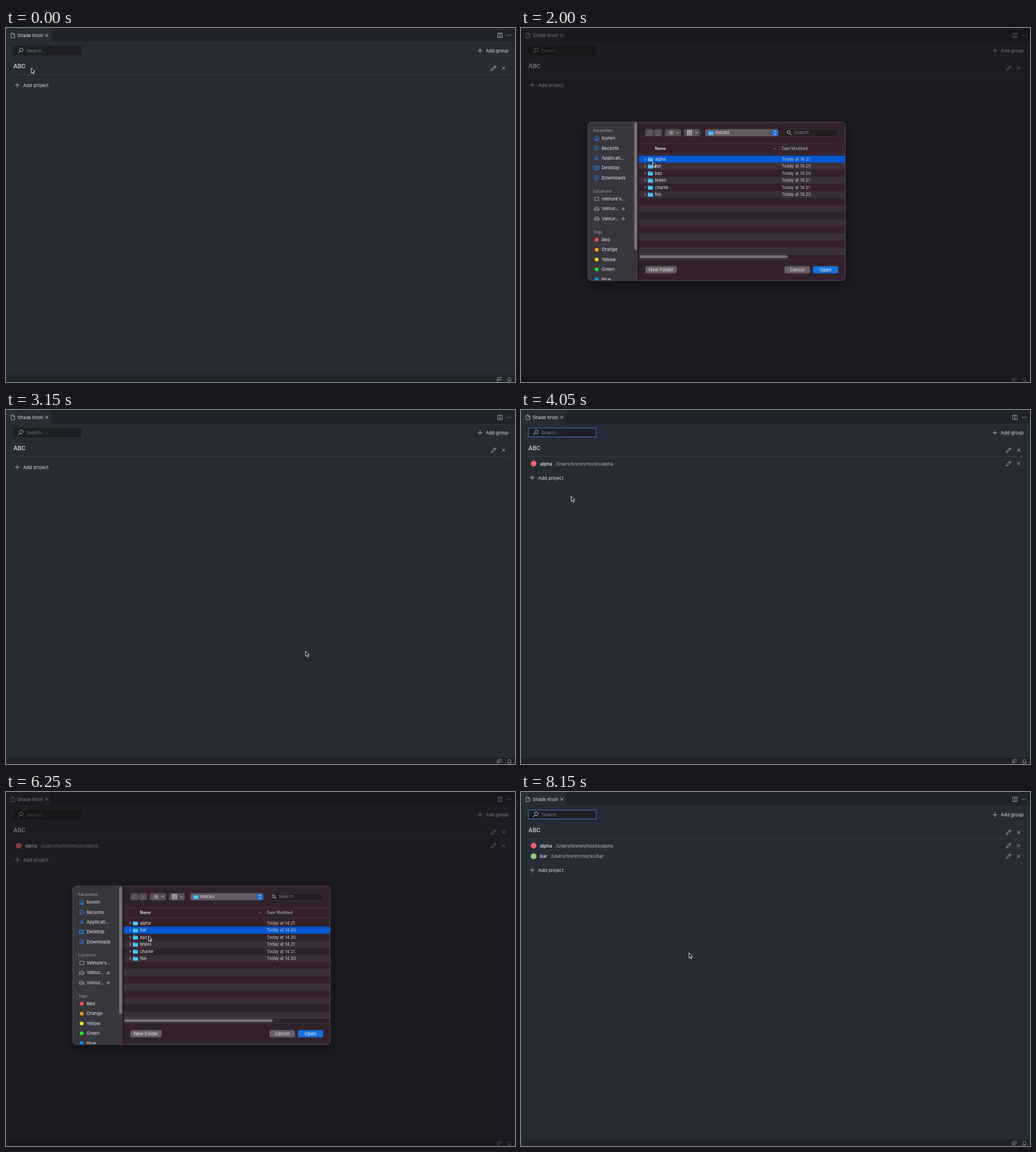
Recreate the animation shown at these times as an HTML page. Size 898 by 624 pixels, loop 8250 ms.

```html
<!DOCTYPE html>
<html lang="en">
<head>
<meta charset="utf-8">
<title>Project list</title>
<style>
html, body { margin: 0; width: 100%; height: 100%; overflow: hidden; background: #282c34; }
svg { display: block; font-family: Inter, Roboto, sans-serif; }
text { white-space: pre; }
#sheet { --side: #38363b; --list: #31222b; --stripe: #3c2f37; --accent: #1a8cff; --drive: #a9a7aa; --open: #1871dc; --thumb: #77727a; }
#sheet.idle { --side: #3a3a3a; --list: #1e1e1e; --stripe: #292929; --accent: #000; --drive: #000; --open: #2a76f2; --thumb: #787878; }
#sheet.idle .tag { fill: #000; }
</style>
</head>
<body>
<svg id="stage" width="898" height="624" viewBox="0 0 898 624"></svg>
<script>
const LOOP = 8250, STEP = 50;
const ROW = 12.45, LIST_TOP = 225;

const attrs = o => Object.entries(o).map(([k, v]) => `${k}="${v}"`).join(' ');
const rect = (x, y, w, h, fill, more = {}) =>
  `<rect ${attrs({ x, y, width: w, height: h, fill, ...more })}/>`;
const line = (d, stroke, width = 0.8, more = {}) =>
  `<path ${attrs({ d, stroke, 'stroke-width': width, fill: 'none', ...more })}/>`;
const dot = (x, y, r, fill, more = {}) => `<circle ${attrs({ cx: x, cy: y, r, fill, ...more })}/>`;
const at = (x, y, body) => `<g transform="translate(${x} ${y})">${body}</g>`;
// y is the middle of the capitals
const text = (x, y, str, size = 8, fill = '#d3d5da', weight = 400, anchor = 'start') =>
  `<text ${attrs({ x, y: y + size * 0.36, 'font-size': size, fill, 'font-weight': weight, 'text-anchor': anchor })}>${str}</text>`;

const cross = (x, y, r = 2.6) => at(x, y, line(`M${-r} ${-r}L${r} ${r}M${r} ${-r}L${-r} ${r}`, '#c9ccd2', 0.9));
const plus = (x, y) => at(x, y, line('M-4.2 0H4.2M0-4.2V4.2', '#d0d2d7', 0.85));
const pencil = (x, y) => at(x, y,
  line('M-4 4L-3.2 1.3L2-3.9Q3-4.6 3.9-3.7Q4.6-2.8 3.8-2L-1.4 3.2ZM1-2.9L2.9-1', '#c9ccd2', 0.85));
const lens = (x, y, r, flip, color) => at(x, y,
  dot(0, 0, r, 'none', { stroke: color, 'stroke-width': 0.9 }) +
  line(`M${0.7 * r * flip} ${0.7 * r}L${1.85 * r * flip} ${1.9 * r}`, color, 1));

function editor() {
  return rect(0, 0, 898, 624, '#282c34') +
    rect(0, 0, 898, 24, '#21252b') + rect(1, 0, 79.5, 24, '#282c34') +
    rect(80, 0, 0.8, 24, '#1b1e23') + rect(0, 0, 1, 612, '#20232a') +
    line('M9 9H13L15.3 11.3V17H9ZM12.8 9V11.5H15.3', '#c9ccd2', 0.8) +
    text(20.3, 13, 'Shade Knoll', 8, '#dcdee2') + cross(72, 13) +
    line('M867.7 9.2H875.3V16.8H867.7ZM871.5 9.2V16.8', '#c9ccd2', 0.8) +
    [884.3, 887.4, 890.5].map(x => dot(x, 13, 0.75, '#c9ccd2')).join('') +
    rect(13, 31.5, 120, 16.5, '#1d1f23') +
    `<rect id="focus" x="13" y="31.8" width="119.6" height="15.8" fill="none" stroke="#4879d8" stroke-width="1"/>` +
    lens(27, 38.5, 3.2, -1, '#c9ccd2') + text(36, 40, 'Search...', 8, '#777a81') +
    plus(836.3, 40) + text(846.4, 40, 'Add group', 8.15, '#dcdee2') +
    text(13, 67.5, 'ABC', 10, '#b7bbc4', 700) + pencil(860, 71) + cross(878, 71) +
    rect(13, 82, 875, 0.8, '#3d424d') +
    project(0, 'alpha', 61.3, '#f4616e') + project(1, 'bar', 52.8, '#8fcc72') +
    `<g id="add">` + `<rect id="hover" x="13" y="94" width="64" height="14" rx="3" fill="#5a5d5e" opacity=".31"/>` +
    plus(20, 100.6) + text(30.3, 101, 'Add project', 8.15, '#dcdee2') + `</g>` +
    rect(0, 612, 898, 12, '#21252b') + rect(0, 622.5, 898, 1.5, '#1a1c23') +
    at(869.5, 619.5, line('M-2-3.5H3.8V.8H2.2L.8 2.2V.8M-3.6 4Q-3.4 1.3-1.5 1.3Q.3 1.3.5 4', '#a9adb5', 0.75) +
      dot(-1.5, -0.4, 1.5, 'none', { stroke: '#a9adb5', 'stroke-width': 0.75 })) +
    at(888, 619.5, line('M-3.4 2.3H3.4L2.5.8V-1Q2.4-3.5 0-3.5Q-2.4-3.5-2.5-1V.8ZM-1 2.6Q0 4.2 1 2.6', '#a9adb5', 0.8));
}

function project(i, name, pathX, color) {
  const y = 94.6 + 18.7 * i;
  return `<g id="project${i}">` + dot(22.3, y, 5.1, color) +
    text(33.2, y + 0.2, name, 8.15, '#c5c8cf', 700) +
    text(pathX, y + 0.2, '/Users/tovren/mocks/' + name, 7.85, '#b9bdc5') +
    pencil(860, y) + cross(878, y) + `</g>`;
}

function sidebar() {
  const accent = 'var(--accent)', drive = 'var(--drive)';
  const icon = (y, d, color = accent) => at(133.5, y, line(d, color, 0.95));
  const ring = y => dot(133.5, y, 3.9, 'none', { stroke: accent, 'stroke-width': 0.9 });
  const label = (y, s) => text(142.3, y, s, 8, '#e9e8ea');
  const head = (y, s) => text(127.7, y, s, 6.85, '#98959a', 500);
  const disk = y => icon(y, 'M-4.2.5L-2.6-2.7H2.6L4.2.5V3H-4.2ZM-4.2.5H4.2', drive) +
    at(180.5, y, `<path d="M-3 .5L0-2.7L3 .5ZM-3 1.4H3V2.5H-3Z" fill="#99969a"/>`);
  const places = ['tovren', 'Recents', 'Applicati...', 'Desktop', 'Downloads'];
  const tags = { Red: '#ff4f4b', Orange: '#ff9b0b', Yellow: '#ffec0c', Green: '#16ef25', Blue: '#0c92ff' };
  return rect(118, 166, 88.5, 279, 'var(--side)') +
    head(180.7, 'Favourites') + places.map((s, i) => label(194.4 + 17.4 * i, s)).join('') +
    icon(194.4, 'M-4.3 0L0-4L4.3 0M-3-.8V3.8H3V-.8M-1 3.5V1H1V3.5') +
    ring(211.8) + icon(211.8, 'M0-2.4V.2H-1.8') +
    icon(229.2, 'M-3.2 3.4L.7-3.8M3.2 3.4L-.7-3.8M-4.2 1.3H4.2') +
    icon(246.6, 'M-4.2-3.2H4.2V3.2H-4.2ZM-4-1.6H4M-2.5 2H2.5') +
    ring(264) + icon(264, 'M0-2.2V2M-1.7.4L0 2.1L1.7.4') +
    head(287.5, 'Locations') +
    icon(301.2, 'M-3.4 2V-2.9H3.4V2M-4.8 2.7H4.8', drive) + label(301.2, "Velnure's...") +
    [318.6, 336].map(y => disk(y) + label(y, 'Velnur...')).join('') +
    head(359.6, 'Tags') +
    Object.entries(tags).map(([s, c], i) =>
      dot(133.5, 373.3 + 17.4 * i, 3.3, c, { class: 'tag' }) + label(373.2 + 17.4 * i, s)).join('') +
    rect(206.3, 166, 1.2, 279, '#151215') +
    rect(199.6, 167, 5.2, 224, 'var(--thumb)', { rx: 2.6 });
}

const folder = (x, y) => at(x, y,
  `<path d="M-4.4-3Q-4.4-3.8-3.6-3.8H-1.2L-.3-2.9H3.7Q4.4-2.9 4.4-2.2V3Q4.4 3.8 3.6 3.8H-3.6Q-4.4 3.8-4.4 3Z" fill="#219bd6"/>` +
  rect(-4.4, -1.7, 8.8, 5.5, '#4fc3f7', { rx: 0.7 }));

function fileList() {
  const files = { alpha: 21, bar: 20, baz: 20, bravo: 21, charlie: 21, foo: 20 };
  let out = '';
  for (let i = 1; i < 14; i += 2) out += rect(207.5, LIST_TOP + i * ROW, 364.5, ROW, 'var(--stripe)');
  out += `<rect id="pick" x="207.5" y="${LIST_TOP}" width="364.5" height="${ROW}" fill="#0058d0"/>`;
  Object.entries(files).forEach(([name, minute], i) => {
    const y = LIST_TOP + (i + 0.5) * ROW;
    out += line(`M217.8 ${y - 2.2}L220.2 ${y}L217.8 ${y + 2.2}`, '#d2ced1', 1) + folder(228.3, y) +
      text(236.2, y, name, 7.45, '#ebe8ea') + text(460, y, 'Today at 14:' + minute, 7.45, '#cfcacd');
  });
  return out;
}

function controls() {
  const soft = { rx: 3, 'fill-opacity': 0.2 };
  const pill = (x, y, w, h) => rect(x, y, w, h, '#fff', soft);
  const down = x => line(`M${x - 2} 183.6L${x} 185.6L${x + 2} 183.6`, '#dedbdd', 1);
  let rows = '';
  for (const y of [182, 184.5, 187]) {
    rows += rect(260, y - 0.4, 1.1, 0.9, '#dedbdd') + rect(262.3, y - 0.4, 6.2, 0.9, '#dedbdd');
    for (const x of [293, 296.2, 299.4]) rows += rect(x, y - 1.2, 2.4, 1.8, '#cfcbce');
  }
  return pill(219.5, 178.3, 14.2, 12.7) + pill(234.7, 178.3, 14.2, 12.7) +
    line('M228 181.8L225.2 184.6L228 187.4M240.6 181.8L243.4 184.6L240.6 187.4', '#8e868b', 0.9) +
    pill(253.7, 178.3, 28.5, 12.7) + pill(287.5, 178.3, 28, 12.7) + rows + down(276.2) + down(309.3) +
    line('M293 180.2H301.8M293 189.2H301.8', '#cfcbce', 0.7) +
    rect(325, 178.3, 129, 12.7, '#fff', { rx: 3, 'fill-opacity': 0.25 }) + folder(335, 184.6) +
    text(342.8, 184.4, 'mocks', 7.95, '#ebe8ea') +
    rect(443, 179.2, 10, 11, '#1871dc', { rx: 2.2 }) +
    line('M446 183.4L448 181.4L450 183.4M446 186L448 188L450 186', '#fff', 1) +
    rect(464.5, 178.4, 94.5, 12.5, '#000', { rx: 3, 'fill-opacity': 0.2, stroke: '#fff', 'stroke-opacity': 0.12, 'stroke-width': 0.7 }) +
    lens(472.2, 183.8, 2.7, 1, '#dedbdd') + text(481.3, 184.6, 'Search', 7.95, '#8f888d') +
    line('M207.5 204.3H572M207.5 222H572M455.6 205V222M568 205V222M207.5 398.2H572M207.5 408H572', '#fff', 0.7, { 'stroke-opacity': 0.13 }) +
    text(236.2, 212.7, 'Name', 6.9, '#ebe8ea', 600) + text(460, 212.7, 'Date Modified', 6.9, '#cfcacd') +
    line('M445.4 214.1L447.6 211.9L449.8 214.1', '#a8a2a6', 0.9) +
    rect(209, 400.4, 261.5, 5.2, 'var(--thumb)', { rx: 2.6 }) +
    rect(219.5, 419.8, 55.2, 12.8, '#fff', { rx: 3, 'fill-opacity': 0.28 }) +
    text(247, 426.2, 'New Folder', 8, '#ebe8ea', 400, 'middle') +
    rect(465, 419.8, 44.7, 12.8, '#fff', { rx: 3, 'fill-opacity': 0.28 }) +
    text(487.3, 426.2, 'Cancel', 8, '#ebe8ea', 400, 'middle') +
    rect(515, 419.8, 44.6, 12.8, 'var(--open)', { rx: 3 }) +
    text(537.3, 426.2, 'Open', 8, '#fff', 400, 'middle');
}

const frame = (fill, more) => rect(118, 166, 454, 279, fill, { rx: 6, ...more });
const pointerStyle = 'fill="#111" stroke="#fff" stroke-width=".9" stroke-linejoin="round"';

document.getElementById('stage').innerHTML =
  `<defs><clipPath id="round">${frame('#000')}</clipPath>
   <filter id="blur" x="-20%" y="-25%" width="140%" height="150%"><feGaussianBlur stdDeviation="12"/></filter></defs>` +
  editor() +
  `<rect id="dim" width="898" height="624" fill="#0e0b0a"/>` +
  `<g id="sheet">` + rect(114, 172, 462, 285, '#000', { rx: 10, opacity: 0.32, filter: 'url(#blur)' }) +
  `<g clip-path="url(#round)">` + frame('var(--list)') + fileList() + controls() + sidebar() + `</g>` +
  frame('none', { stroke: '#676267', 'stroke-width': 0.8 }) + `</g>` +
  `<path id="arrow" d="M.5.5V9.7L2.7 7.7L4.1 11L5.5 10.4L4.1 7.2H7Z" ${pointerStyle}/>` +
  `<path id="hand" d="M2.6 6V1.3Q3.4 0 4.2 1.3V4.2Q5 3.5 5.7 4.4Q6.5 3.8 7.1 4.7Q8.4 4.2 8.5 5.6V7.5L7.6 10H3.3L.6 6.6Q.4 5.3 1.6 5.6Z" ${pointerStyle}/>`;

const $ = id => document.getElementById(id);
const show = (id, on) => $(id).setAttribute('visibility', on ? 'visible' : 'hidden');
const clamp = v => Math.max(0, Math.min(1, v));
const within = (t, a, b) => t >= a && t < b;

// time, x, y of the pointer
const path = [
  [0, 44, 70], [200, 36.5, 100], [450, 36.5, 100], [500, 37, 100.5], [650, 37, 100.5],
  [1450, 133, 181], [1850, 222, 229], [2000, 232, 235.5], [2300, 529, 429], [2500, 532, 427],
  [3100, 532, 427], [4000, 88, 152], [4050, 88, 151.5], [4200, 86, 156], [4500, 50, 118],
  [4800, 50, 118], [4950, 82.5, 136], [5700, 131, 234], [6050, 232, 243], [6250, 251, 253],
  [6550, 520, 417], [6800, 526, 422], [7200, 526, 422], [8000, 296, 284], [8150, 296, 283], [8250, 296, 283]
];

function pointer(t) {
  const i = path.findIndex(p => p[0] > t);
  const [t0, x0, y0] = path[i - 1], [t1, x1, y1] = path[i];
  const u = (t - t0) / (t1 - t0), e = u * u * (3 - 2 * u);
  return [x0 + (x1 - x0) * e, y0 + (y1 - y0) * e];
}

function draw(now) {
  const t = Math.floor(now % LOOP / STEP) * STEP;
  const second = t >= 4200;
  const opens = second ? 4875 : 625, idles = second ? 7200 : 2850;
  const enter = clamp((t - opens) / 150), leave = clamp((t - idles - 100) / 200);
  const visible = enter * (1 - leave);

  $('dim').setAttribute('opacity', 0.45 * visible);
  $('sheet').setAttribute('opacity', Math.min(1, 1.75 * visible));
  $('sheet').setAttribute('transform', `translate(0 ${-26 * (1 - visible)})`);
  $('sheet').setAttribute('class', t >= idles ? 'idle' : '');
  show('sheet', visible > 0);
  $('pick').setAttribute('y', LIST_TOP + (second ? ROW : 0));
  show('pick', visible > 0 && t >= (second ? 6050 : 1850));

  const count = t >= 7700 ? 2 : t >= 3350 ? 1 : 0;
  show('project0', count > 0);
  show('project1', count > 1);
  $('add').setAttribute('transform', `translate(0 ${18.6 * count})`);
  show('focus', within(t, 3350, 4600) || t >= 7700);

  const hovering = within(t, 150, 650) || within(t, 4400, 4850);
  const [x, y] = pointer(t);
  show('hover', hovering);
  show('hand', hovering);
  show('arrow', !hovering);
  for (const id of ['hand', 'arrow']) $(id).setAttribute('transform', `translate(${x} ${y})`);
}

const start = performance.now();
function tick() {
  draw(performance.now() - start);
  requestAnimationFrame(tick);
}
tick();
</script>
</body>
</html>
```
